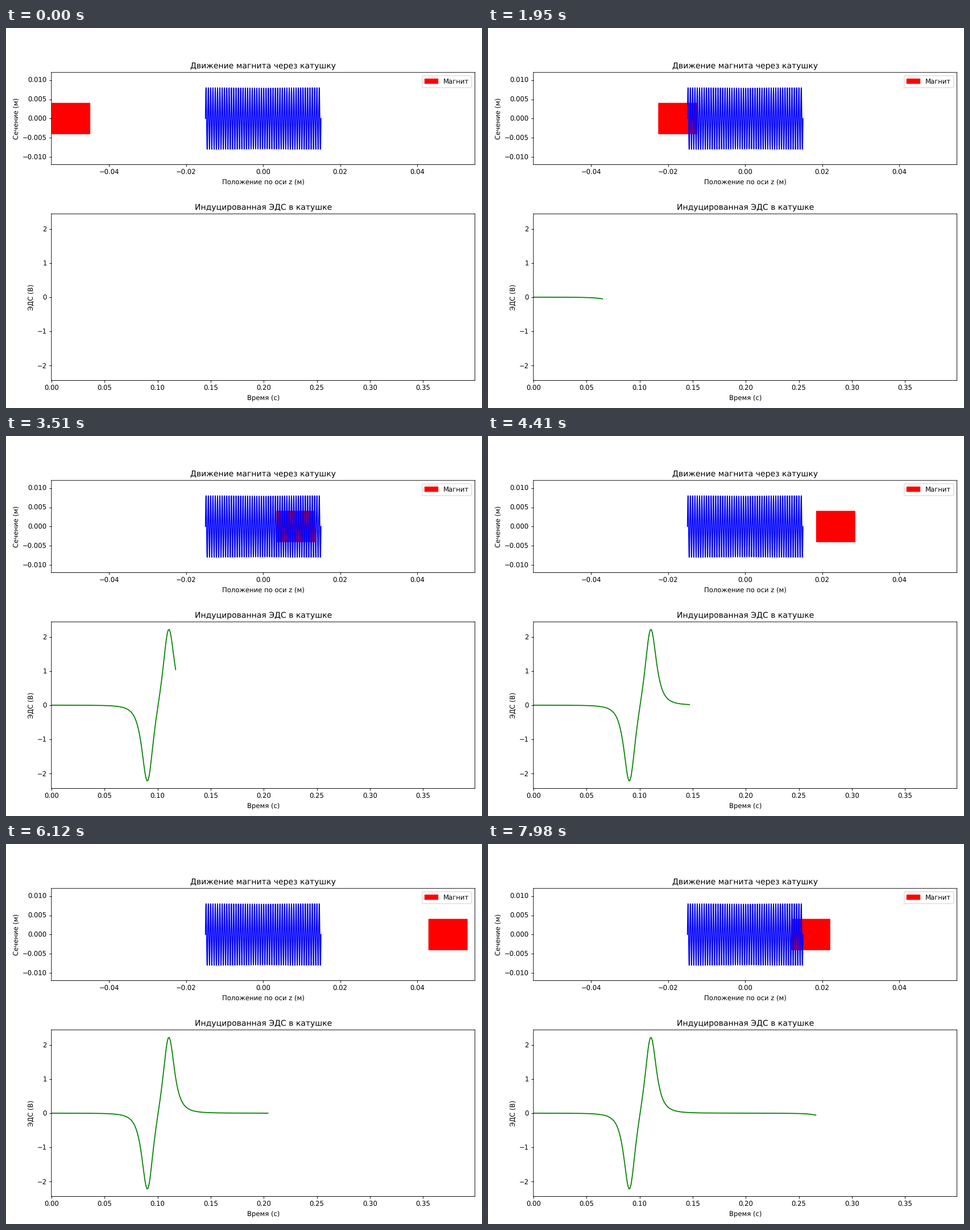
Write a matplotlib script that moves like this. It is 837x669 px and loops after 8000 ms.

```python
import numpy as np
import matplotlib.pyplot as plt
from matplotlib.animation import FuncAnimation
from matplotlib.patches import Rectangle

W, H, DPI = 837, 669, 83.7
FRAMES, LOOP_MS = 267, 8000

MAG_LEN, MAG_R = 0.01, 0.004
COIL_LEN, COIL_R, TURNS = 0.03, 0.008, 50
SPEED, DT, Z_MAX = 0.5, 0.001, 0.05
PEAK = 2.22

t = np.arange(400) * DT
# The magnet goes there and back along the axis
z = Z_MAX - SPEED * np.abs(t - Z_MAX * 2 / SPEED)


def axial_field(pos):
    """Relative field on the axis of a cylindrical magnet."""
    a, b = pos + MAG_LEN / 2, pos - MAG_LEN / 2
    return a / np.hypot(a, MAG_R) - b / np.hypot(b, MAG_R)


field = axial_field(z)
emf = -np.diff(field, prepend=field[0])
emf *= PEAK / np.abs(emf).max()

# Soft, unsnapped rendering
plt.rcParams.update({"font.family": "DejaVu Sans", "path.snap": False,
                     "text.hinting": "none"})
fig = plt.figure(figsize=((W + 1e-6) / DPI, (H + 1e-6) / DPI), dpi=DPI,
                 facecolor="white")


def add_panel(top, bottom, title, xlabel, ylabel, xlim, ymax):
    left, right = 79.9, 824.6
    ax = fig.add_axes([left / W, 1 - bottom / H,
                       (right - left) / W, (bottom - top) / H])
    ax.set(title=title, xlabel=xlabel, ylabel=ylabel,
           xlim=xlim, ylim=(-ymax, ymax))
    return ax


ax_coil = add_panel(78.2, 240.5, "Движение магнита через катушку",
                    "Положение по оси z (м)", "Сечение (м)",
                    (-0.055, 0.055), 0.012)
ax_emf = add_panel(327.2, 620.5, "Индуцированная ЭДС в катушке",
                   "Время (с)", "ЭДС (В)", (0, t[-1]), 1.1 * PEAK)

s = np.linspace(0, 1, 1000)
ax_coil.plot((s - 0.5) * COIL_LEN, COIL_R * np.sin(2 * np.pi * TURNS * s),
             color="blue", lw=1.5)
magnet = Rectangle((z[0] - MAG_LEN / 2, -MAG_R), MAG_LEN, 2 * MAG_R,
                   color="red", label="Магнит")
ax_coil.add_patch(magnet)
ax_coil.legend(loc="upper right")
trace, = ax_emf.plot([], [], color="green", lw=1.5)


def update(i):
    magnet.set_x(z[i] - MAG_LEN / 2)
    trace.set_data(t[:i + 1], emf[:i + 1])
    return magnet, trace


def reset():
    return update(0)


anim = FuncAnimation(fig, update, frames=FRAMES, init_func=reset,
                     interval=LOOP_MS / FRAMES, repeat=True, repeat_delay=0)
plt.show()
```
